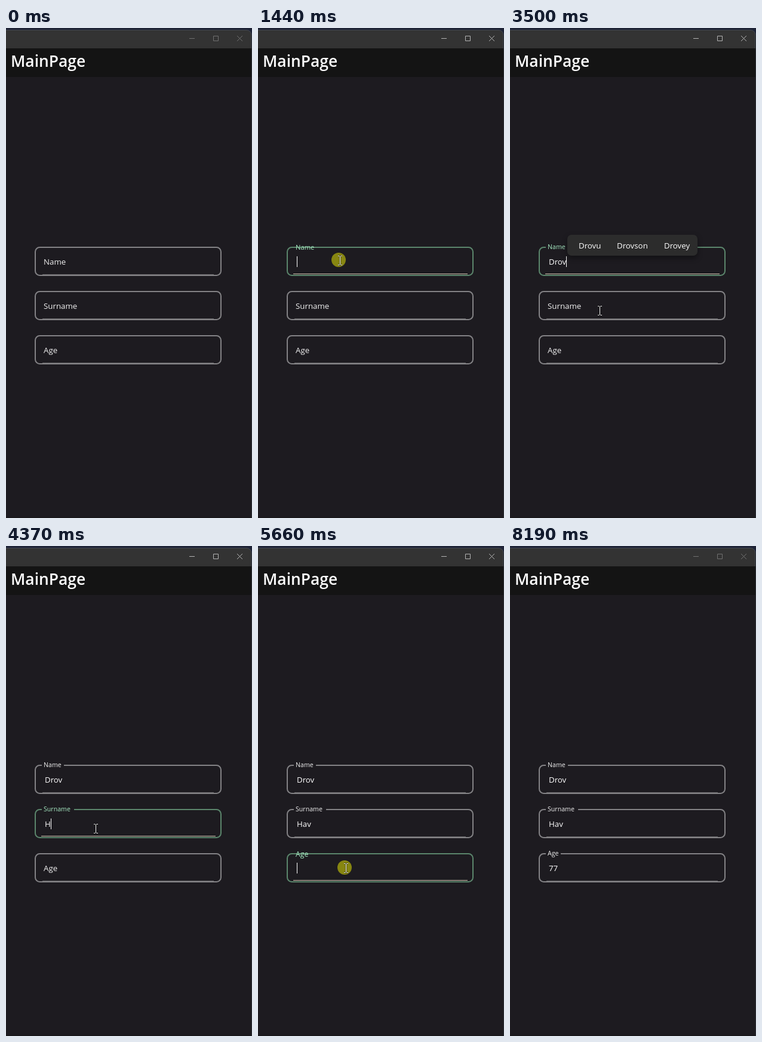
An HTML page that plays this animation: 412x820 px, repeating every 8250 ms.

```html
<!DOCTYPE html>
<html lang="en">
<head>
<meta charset="utf-8">
<title>MainPage</title>
<style>
  html, body { margin: 0; width: 100%; height: 100%; overflow: hidden; background: #1d1b20; }
  svg { display: block; width: 412px; height: 820px; }
  text { font: 13.3px "Open Sans", "Noto Sans", sans-serif; fill: #fff; white-space: pre; }
  .title { font-size: 26.4px; font-weight: 600; }
  .icons { fill: none; stroke: #707070; }
  .active .icons { stroke: #b4b4b4; }
  .frame { fill: none; stroke: #838285; stroke-width: 2; }
  .label { fill: #f1f1f1; }
  .line { fill: #68676a; }
  .focus-line { fill: #d6c8b4; }
  .focused .frame { stroke: #5b866c; }
  .focused .label { fill: #a8ecc4; }
  .focused .line, .field:not(.focused) .focus-line, .field:not(.focused) .caret { display: none; }
  .caret { fill: #fff; }
  .popup rect { fill: #2c2c2c; filter: drop-shadow(0 4px 5px #0006); }
</style>
</head>
<body>
<svg id="stage" viewBox="0 0 412 820">
  <rect width="412" height="820" fill="#1e2336"/>
  <rect x="404" y="12" width="8" height="808" fill="#16191a"/>
  <rect x="-10" y="3.5" width="421" height="840" rx="8" fill="#333" stroke="#434852"/>
  <rect y="34" width="411" height="48" fill="#141414"/>
  <rect y="82" width="411" height="738" fill="#1d1b20"/>
  <rect y="818" width="411" height="2" fill="#19181b"/>
  <g class="icons">
    <path d="M307 17.5h9M347.5 13.5h8v8h-8z"/>
    <path d="M387 13l9 9M396 13l-9 9"/>
  </g>
  <text class="title" x="8" y="65">MainPage</text>
  <g id="fields"></g>
  <g id="popups"></g>
  <circle id="click" r="12" fill="#ff0" fill-opacity=".47"/>
  <path id="arrow" d="M.5 .5V17L4.4 13.3 7 19.2 9.6 18 7 12.3H12z" fill="#fff" stroke="#000" stroke-width=".8"/>
  <g id="beam" fill="none">
    <path d="M-3.5-7.5H3.5M-3.5 7.5H3.5M0-7.5V7.5" stroke="#000" stroke-opacity=".5" stroke-width="2.4"/>
    <path d="M-3.5-7.5H-.8M.8-7.5H3.5M-3.5 7.5H-.8M.8 7.5H3.5M0-7V7" stroke="#fff"/>
  </g>
</svg>
<script>
const LOOP = 8250;
const $ = id => document.getElementById(id);
const passed = (times, t) => times.filter(time => time <= t).length;
const within = (t, [from, to]) => t >= from && t < to;
const show = (el, on) => el.setAttribute('display', on ? 'inline' : 'none');
const place = (el, x, y) => el.setAttribute('transform', `translate(${x} ${y})`);

const fields = [
  { label: 'Name', y: 367, notch: 97, word: 'Drov', keys: [2300, 2430, 2500, 2630],
    lift: [1230, 1300, 1370, 1500], blur: 3640 },
  { label: 'Surname', y: 441, notch: 114, word: 'Hav', keys: [4370, 4570, 4710],
    lift: [3640, 3640, 3710, 3770], blur: 5590 },
  { label: 'Age', y: 515, notch: 85, word: '77', keys: [6990, 7250],
    lift: [5590, 5660, 5720, 5790], blur: 8190 }
];
// Label baseline and font size, from resting to floating
const lifts = [[29, 13.3], [16, 13.2], [5, 12.3], [3.5, 11.2], [3, 10.6]];

const popups = [
  { span: [2830, 3640], x: 96, y: 346, w: 218, items: [[115, 'Drovu'], [179, 'Drovson'], [258, 'Drovey']] },
  { span: [4570, 4840], x: 85, y: 420, w: 175, items: [[104, 'Have'], [164, 'Has'], [215, 'Hand']] },
  { span: [4840, 5590], x: 92, y: 420, w: 195, items: [[111, 'Have'], [170, 'Have this']], bird: true }
];
const bird = `<g transform="translate(258 431)">
  <path d="M0 4L3 2 5 4 6 0 8 2 10 0 11 2 14 1 12 5 14 7 11 9 13 13 8 12 4 13 2 10 3 7z" fill="#f2f2f2"/>
  <path d="M4 5l4 3 4-4M6 10l4 1" fill="none" stroke="#b8bcc0" stroke-width=".8"/>
  <path d="M0 5l2 2-1 2z" fill="#4f9a55"/></g>`;

const clicks = [[1230, 1500], [3640, 3770], [5590, 5790]];

// Pointer positions as [time, x, y]; each holds until the next
const entry = Array.from({ length: 12 }, (_, i) => {
  const left = (1 - i / 11) ** 2.36;
  return [390 + 70 * i, 137.5 + 112.5 * left, 392 + 327 * left];
});
const pointer = [
  ...entry, [1230, 137.5, 389],
  [3240, 141.5, 396], [3300, 155, 418], [3370, 159, 442], [3430, 154.5, 463], [3500, 150.5, 473],
  [5180, 151.5, 480], [5250, 153, 491], [5310, 153, 503], [5380, 151.5, 517], [5440, 149.5, 529],
  [5520, 147.5, 537], [5590, 147.5, 539], [5990, 150.5, 539], [6060, 153.5, 539],
  [7510, 168, 556], [7580, 215, 615], [7640, 295, 700], [7710, 396, 798], [7790, 420, 840]
];

$('fields').innerHTML = fields.map(f => `<g class="field" transform="translate(0 ${f.y})">
  <rect class="frame" x="49" y="0" width="311" height="47" rx="7.5"/>
  <rect class="line" x="61" y="45" width="287" height="1"/>
  <rect class="focus-line" x="59" y="44" width="292" height="1"/>
  <rect class="notch" x="60" y="-2" width="${f.notch - 60}" height="4" fill="#1d1b20"/>
  <text class="label" x="63">${f.label}</text>
  <text class="value" x="65" y="29"></text>
  <rect class="caret" y="15" width="1" height="18"/></g>`).join('');
$('popups').innerHTML = popups.map(p => `<g class="popup">
  <rect x="${p.x}" y="${p.y}" width="${p.w}" height="35" rx="7"/>
  ${p.items.map(([x, word]) => `<text x="${x}" y="${p.y + 23}">${word}</text>`).join('')}
  ${p.bird ? bird : ''}</g>`).join('');

fields.forEach((f, i) => {
  f.el = $('fields').children[i];
  for (const part of ['notch', 'label', 'value', 'caret'])
    f[part + 'El'] = f.el.querySelector('.' + part);
});
popups.forEach((p, i) => p.el = $('popups').children[i]);

function drawField(f, t) {
  const stage = passed(f.lift, t);
  const [y, size] = lifts[stage];
  f.el.classList.toggle('focused', within(t, [f.lift[0], f.blur]));
  f.labelEl.setAttribute('y', y);
  f.labelEl.style.fontSize = size + 'px';
  show(f.notchEl, stage === 4);
  const typed = f.word.slice(0, passed(f.keys, t));
  f.valueEl.textContent = typed;
  f.caretEl.setAttribute('x', typed ? Math.round(65 + f.valueEl.getComputedTextLength()) : 65);
}

function drawPointer(t) {
  const [, x, y] = pointer[passed(pointer.map(p => p[0]), t) - 1] || [0, -50, -50];
  const overField = fields.some(f => y > f.y && y < f.y + 47);
  show($('beam'), overField);
  show($('arrow'), !overField);
  place($('beam'), x, y);
  place($('arrow'), x, y);
  place($('click'), x - 2.5, y - 1);
  show($('click'), clicks.some(span => within(t, span)));
}

function draw() {
  const t = performance.now() % LOOP;
  $('stage').classList.toggle('active', within(t, [1230, 8120]));
  fields.forEach(f => drawField(f, t));
  popups.forEach(p => show(p.el, within(t, p.span)));
  drawPointer(t);
  requestAnimationFrame(draw);
}
draw();
</script>
</body>
</html>
```
